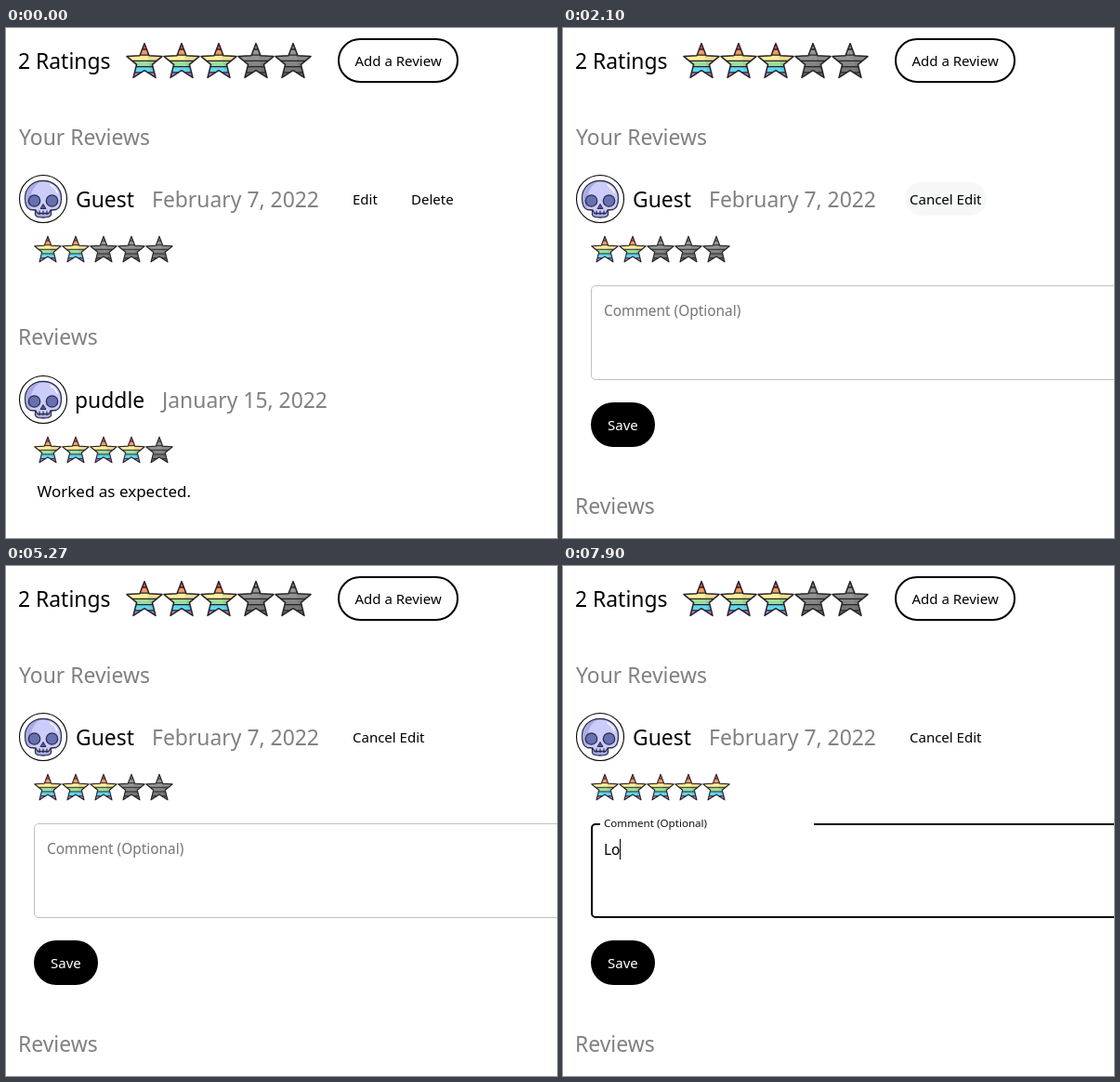
Animation of 593x549 px, one loop 8000 ms. Source, as an HTML page:

```html
<!DOCTYPE html>
<html lang="en">
<head>
<meta charset="utf-8">
<title>Ratings and reviews</title>
<style>
  html, body { margin: 0; width: 100%; height: 100%; overflow: hidden; background: #fff; }
  svg { display: block; font-family: "Noto Sans", sans-serif; }
  .head { font-size: 22.9px; }
  .btn { font-size: 15px; }
  .field { font-size: 15.4px; }
  .body { font-size: 17px; }
  .muted { fill: #808080; }
</style>
</head>
<body>
<svg id="stage" width="593" height="549" viewBox="0 0 593 549">
  <defs>
    <path id="shape" d="M20 1.6 25 14.8 39 15.6 28.4 24.3 32 38.4 20 30.7 8 38.4 11.6 24.3 1 15.6 15 14.8Z"/>
    <clipPath id="cut"><use href="#shape"/></clipPath>
    <g id="on"></g>
    <g id="off"></g>
    <g id="skull" stroke="#2b2f4e" stroke-linejoin="round">
      <circle r="25.5" fill="#fff" stroke="#000" stroke-width="1.1"/>
      <path d="M-8.500 9V17Q-8 20 0 20T8.500 17V9Z" fill="#a9abe2" stroke-width="1.300"/>
      <path d="M0-19.500C12-19.500 19.500-11 19.500-1 19.500 5 18 10 14 11.500L8 12 6 15.500H-6L-8 12-14 11.500C-18 10-19.500 5-19.500-1-19.500-11-12-19.500 0-19.500Z" fill="#ccccfb" stroke-width="1.300"/>
      <path d="M-3-18.500C-13-17-19-10-18.500-1-18 6-17 9.500-13.500 10.500-15-4-12-13-3-18.500Z" fill="#a9abe2" stroke="none"/>
      <path d="M8-15Q13-12 15-7" fill="none" stroke="#fff" stroke-width="1.500" stroke-linecap="round"/>
      <circle cx="-9.500" cy="2" r="6.200" fill="#6870b0" stroke-width="1.300"/>
      <circle cx="9.500" cy="2" r="6.200" fill="#6870b0" stroke-width="1.300"/>
      <path d="M0 5.500 3 10.500H-3Z" fill="#4d548c" stroke-width="1"/>
      <path d="M-4 12.500V17M0 12.500V17M4 12.500V17" fill="none" stroke-width="1.200"/>
    </g>
  </defs>

  <text class="head" x="13" y="44">2 Ratings</text>
  <g id="average"></g>
  <rect x="358" y="12" width="128" height="46" rx="23" fill="none" stroke="#000" stroke-width="2"/>
  <text class="btn" x="375.500" y="41">Add a Review</text>

  <text class="head muted" x="14" y="126">Your Reviews</text>
  <use href="#skull" x="40" y="184"/>
  <text class="head" x="75" y="193">Guest</text>
  <text class="head muted" x="157" y="193">February 7, 2022</text>
  <rect id="pill" x="368" y="166" height="36" rx="18" fill="#f6f8f8"/>
  <text class="btn" id="edit" x="373" y="190"></text>
  <text class="btn" id="del" x="436" y="190">Delete</text>
  <g id="mine"></g>

  <g id="form">
    <rect id="box" fill="none"/>
    <rect id="gap" x="40" y="275" height="5" fill="#fff"/>
    <text class="field" id="label">Comment (Optional)</text>
    <text class="field" id="typed" x="44" y="311"></text>
    <rect id="caret" y="294" width="1" height="22"/>
    <rect x="30" y="403" width="69" height="48" rx="24"/>
    <text class="btn" x="48" y="433" fill="#fff" font-weight="500">Save</text>
  </g>

  <g id="others">
    <text class="head muted" x="13" y="341">Reviews</text>
    <use href="#skull" x="40" y="400"/>
    <text class="head" x="74" y="409">puddle</text>
    <text class="head muted" x="168" y="409">January 15, 2022</text>
    <g id="theirs"></g>
    <text class="body" x="33.500" y="504.500">Worked as expected.</text>
  </g>
</svg>
<script>
const LOOP = 8000;
const $ = id => document.getElementById(id);
const show = (el, yes) => el.setAttribute('visibility', yes ? 'inherit' : 'hidden');
const set = (el, attrs) => { for (const k in attrs) el.setAttribute(k, attrs[k]); };
const clamp = v => Math.min(1, Math.max(0, v));
const mix = (a, b, p) => a + (b - a) * p;

// Striped star: six bands, a shaded right edge and dark dividers
function paintStar(id, colors, line) {
  const bands = colors.map((c, i) =>
    `<rect y="${1.8 + i * 6.2}" width="40" height="6.3" fill="${c}"/>`).join('');
  const rules = colors.slice(1).map((c, i) => `M0 ${8 + i * 6.2}H40`).join('');
  $(id).innerHTML = `<g clip-path="url(#cut)">${bands}
    <path d="M20 0 28 40H40V0Z" fill="#000" opacity=".07"/>
    <path d="${rules}" stroke="${line}" stroke-width="1.3"/></g>
    <use href="#shape" fill="none" stroke="${line}" stroke-width="1.5" stroke-linejoin="round"/>`;
}
paintStar('on', ['#ee5468', '#f69a60', '#fff09a', '#9fdc9c', '#5cd9f2', '#b58ad8'], '#2a2129');
paintStar('off', ['#8c8c8c', '#959595', '#949494', '#868686', '#787878', '#6a6a6a'], '#242424');

function stars(id, x, y, size, count) {
  const el = $(id);
  if (el.dataset.count == count) return;
  el.dataset.count = count;
  el.innerHTML = [0, 1, 2, 3, 4].map(i =>
    `<use href="#${i < count ? 'on' : 'off'}" transform="translate(${x + i * size} ${y}) scale(${size / 40})"/>`).join('');
}
stars('average', 129, 15, 40, 3);
stars('theirs', 30, 439, 30, 4);

// Last table value whose time has come
const at = (table, t) => table.reduce((v, [time, next]) => t >= time ? next : v, table[0][1]);

const RATING = [[0, 2], [3770, 3], [3850, 4], [3930, 5], [4470, 4], [4530, 3], [4620, 2], [4700, 1],
  [5170, 2], [5260, 3], [5340, 4], [5430, 5]];
const TYPED = [[0, ''], [7700, 'L'], [7900, 'Lo']];
const CARET = [[0, 0], [6733, 44], [7230, 0], [7700, 52], [7900, 61]];

// cubic-bezier(0, 0, .2, 1)
function easeOut(x) {
  let lo = 0, hi = 1;
  for (let i = 0; i < 24; i++) {
    const s = (lo + hi) / 2;
    if (0.6 * s * s * (1 - s) + s ** 3 < x) lo = s; else hi = s;
  }
  return 3 * lo * lo - 2 * lo ** 3;
}

function render(t) {
  const editing = t >= 1900, focused = t >= 6700;

  const hover = t < 1900 ? Math.ceil(clamp((t - 969) / 230) * 4) / 4
    : 1 - Math.ceil(clamp((t - 2669) / 60) * 3) / 3;
  set($('pill'), { width: editing ? 88 : 37, opacity: hover });
  $('edit').textContent = editing ? 'Cancel Edit' : 'Edit';
  show($('del'), !editing);
  show($('form'), editing);
  set($('others'), { transform: `translate(0 ${editing ? 182 : 0})` });
  stars('mine', 30, 223, 30, at(RATING, t));

  const w = focused ? 2 : 1;
  set($('box'), {
    x: 30 + w / 2, y: 277 + w / 2, width: 620, height: 102 - w, rx: 5 - w / 2,
    stroke: t >= 6400 ? '#000' : '#c0c0c0', 'stroke-width': w
  });

  const step = focused ? Math.floor((t - 6700) / 33.3) * 33.3 + 6700 : 0;
  const p = easeOut(clamp((step - 6670) / 200));
  set($('gap'), { width: 230 * easeOut(clamp((step - 6720) / 100)) });
  const tone = Math.round(mix(117, 20, p));
  set($('label'), {
    transform: `translate(44 ${mix(310, 281, p)}) scale(${mix(1, 0.755, p)})`,
    fill: `rgb(${tone},${tone},${tone})`
  });
  $('typed').textContent = at(TYPED, t);
  const caret = at(CARET, t);
  show($('caret'), editing && caret > 0);
  set($('caret'), { x: caret });
}

const start = performance.now();
function tick() {
  render((performance.now() - start) % LOOP);
  requestAnimationFrame(tick);
}
render(0);
requestAnimationFrame(tick);
</script>
</body>
</html>
```
